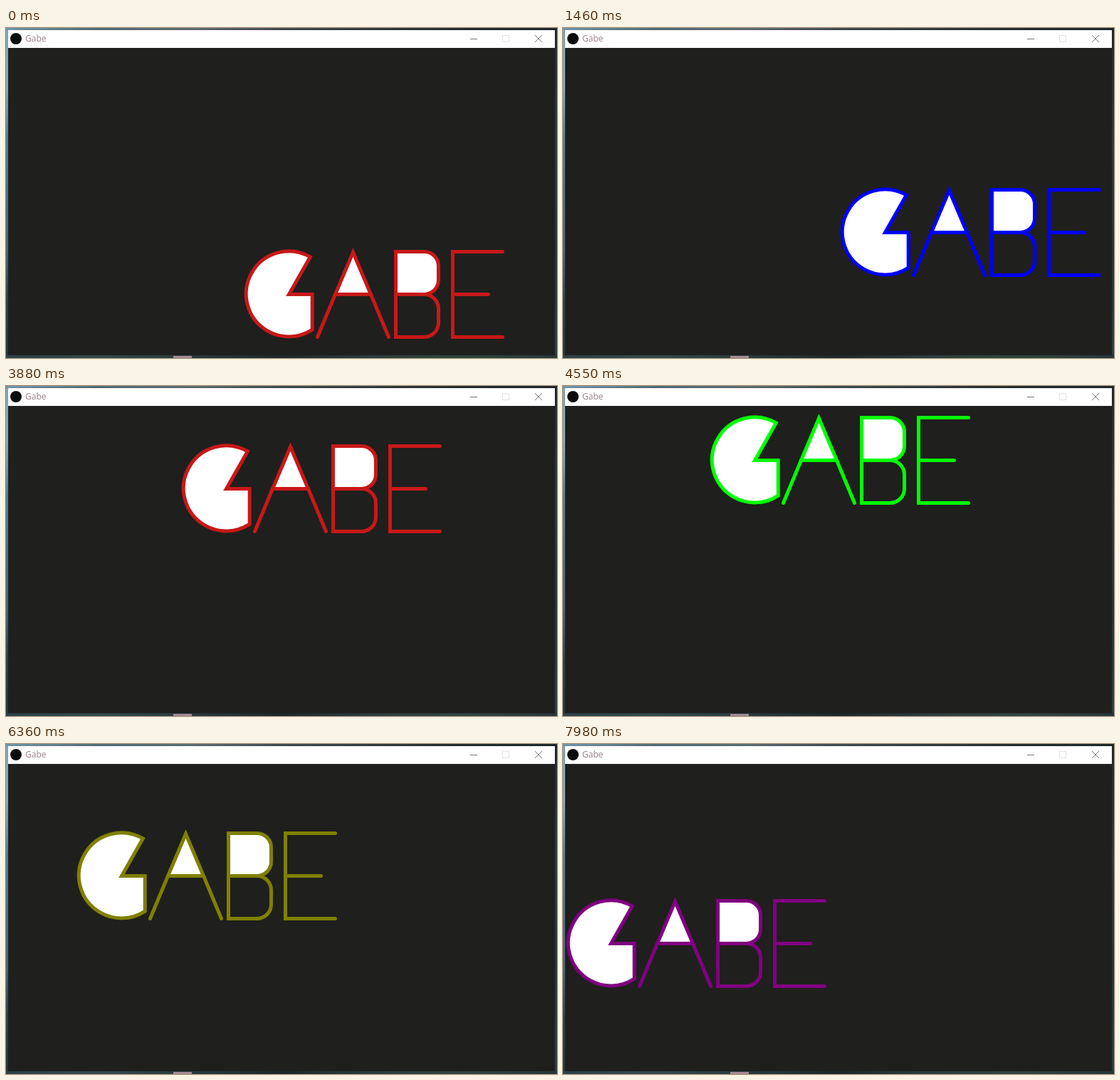
An HTML page with a canvas that plays this animation: 774 by 464 pixels, repeating every 8000 ms.

```html
<!DOCTYPE html>
<html lang="en">
<head>
<meta charset="utf-8">
<title>Gabe</title>
<style>
  html, body { margin: 0; width: 100%; height: 100%; overflow: hidden; background: #1f1f1d; }
  canvas { display: block; }
</style>
</head>
<body>
<canvas id="stage" width="774" height="464"></canvas>
<script>
const ctx = document.getElementById('stage').getContext('2d');

const LOOP = 8000;
const FRAME = 47.6;            // ms between redraws
const STEP = 2.81;             // px travelled per redraw on each axis
const RIGHT_BOUNCE = 71;       // px until the right wall
const TOP_BOUNCE = 283;        // px until the title bar
const BAND_COLORS = ['#800080', '#808000', '#00ff00', '#c81818', '#0000ff'];

function gradientStrip(x, y, w, h, colors) {
  const g = w > h ? ctx.createLinearGradient(x, 0, x + w, 0)
                  : ctx.createLinearGradient(0, y, 0, y + h);
  colors.forEach((c, i) => g.addColorStop(i / (colors.length - 1), c));
  ctx.fillStyle = g;
  ctx.fillRect(x, y, w, h);
}

function line(...points) {
  ctx.beginPath();
  for (let i = 0; i < points.length; i += 2) ctx.lineTo(points[i], points[i + 1]);
  ctx.stroke();
}

function fillAndStroke() {
  ctx.closePath();
  ctx.fill();
  ctx.stroke();
}

function drawWindow() {
  gradientStrip(0, 0, 774, 3, ['#6f95a8', '#4f6a74', '#5b6b70', '#3c4a4e', '#30383a', '#222a2c', '#1d2628']);
  gradientStrip(0, 3, 3, 461, ['#7fa3b8', '#86a8b9', '#567b92', '#4c7088', '#48667a', '#2c4048', '#25353a']);
  gradientStrip(771, 3, 3, 461, ['#1e2a2e', '#2b3b40', '#22363a', '#2a4044']);
  gradientStrip(0, 460, 774, 4, ['#2c4046', '#33484a', '#283a3c', '#1c2628', '#2b3c3c', '#30443f', '#263638']);
  ctx.fillStyle = '#a48a90';
  ctx.fillRect(235, 461, 26, 3);

  ctx.fillStyle = '#fff';
  ctx.fillRect(3, 3, 768, 25);
  ctx.fillStyle = '#1f1f1d';
  ctx.fillRect(3, 28, 768, 432);

  ctx.fillStyle = '#0c0c0c';
  ctx.beginPath();
  ctx.arc(14, 15, 8, 0, Math.PI * 2);
  ctx.fill();
  ctx.fillStyle = '#9a8086';
  ctx.font = '12px "Open Sans", sans-serif';
  ctx.fillText('Gabe', 27, 19);

  ctx.lineWidth = 1;
  ctx.lineCap = 'butt';
  ctx.strokeStyle = '#777';
  line(652, 15.5, 662, 15.5);
  line(743, 10, 753, 20);
  line(753, 10, 743, 20);
  ctx.strokeStyle = '#e2e2e2';
  ctx.strokeRect(697.5, 10.5, 9, 9);
}

function drawName(dx, dy) {
  const band = Math.min(4, Math.floor((394 + dx) / 100));
  ctx.save();
  ctx.translate(dx, dy);
  ctx.fillStyle = '#fff';
  ctx.strokeStyle = BAND_COLORS[band];
  ctx.lineWidth = 5;
  ctx.lineJoin = 'miter';
  ctx.lineCap = band === 4 ? 'square' : 'round';

  // G
  ctx.beginPath();
  ctx.arc(397.3, 373.9, 60, -Math.PI / 3, 0.99, true);
  ctx.lineTo(430.2, 374.5);
  ctx.lineTo(397.5, 374.5);
  fillAndStroke();

  // A
  line(462.5, 374.5, 437.5, 434.5);
  line(512.5, 374.5, 537.5, 434.5);
  ctx.beginPath();
  ctx.moveTo(487.5, 315.5);
  ctx.lineTo(512.5, 374.5);
  ctx.lineTo(462.5, 374.5);
  fillAndStroke();

  // B, only the upper bowl is filled
  ctx.beginPath();
  ctx.roundRect(547.5, 374.5, 60, 60, [0, 20, 20, 0]);
  ctx.stroke();
  ctx.beginPath();
  ctx.roundRect(547.5, 314.5, 60, 60, [0, 20, 20, 0]);
  fillAndStroke();

  // E
  line(697.5, 314.5, 627.5, 314.5, 627.5, 434.5, 697.5, 434.5);
  line(627.5, 374.5, 677.5, 374.5);
  ctx.restore();
}

function render(now) {
  const t = now % LOOP;
  const tick = Math.max(0, Math.floor((t - 21) / FRAME) + 1);
  const travelled = Math.round(tick * STEP);
  const dx = RIGHT_BOUNCE - Math.abs(travelled - RIGHT_BOUNCE);
  const dy = Math.abs(travelled - TOP_BOUNCE) - TOP_BOUNCE;
  drawWindow();
  drawName(dx, dy);
  requestAnimationFrame(render);
}

requestAnimationFrame(render);
</script>
</body>
</html>
```
